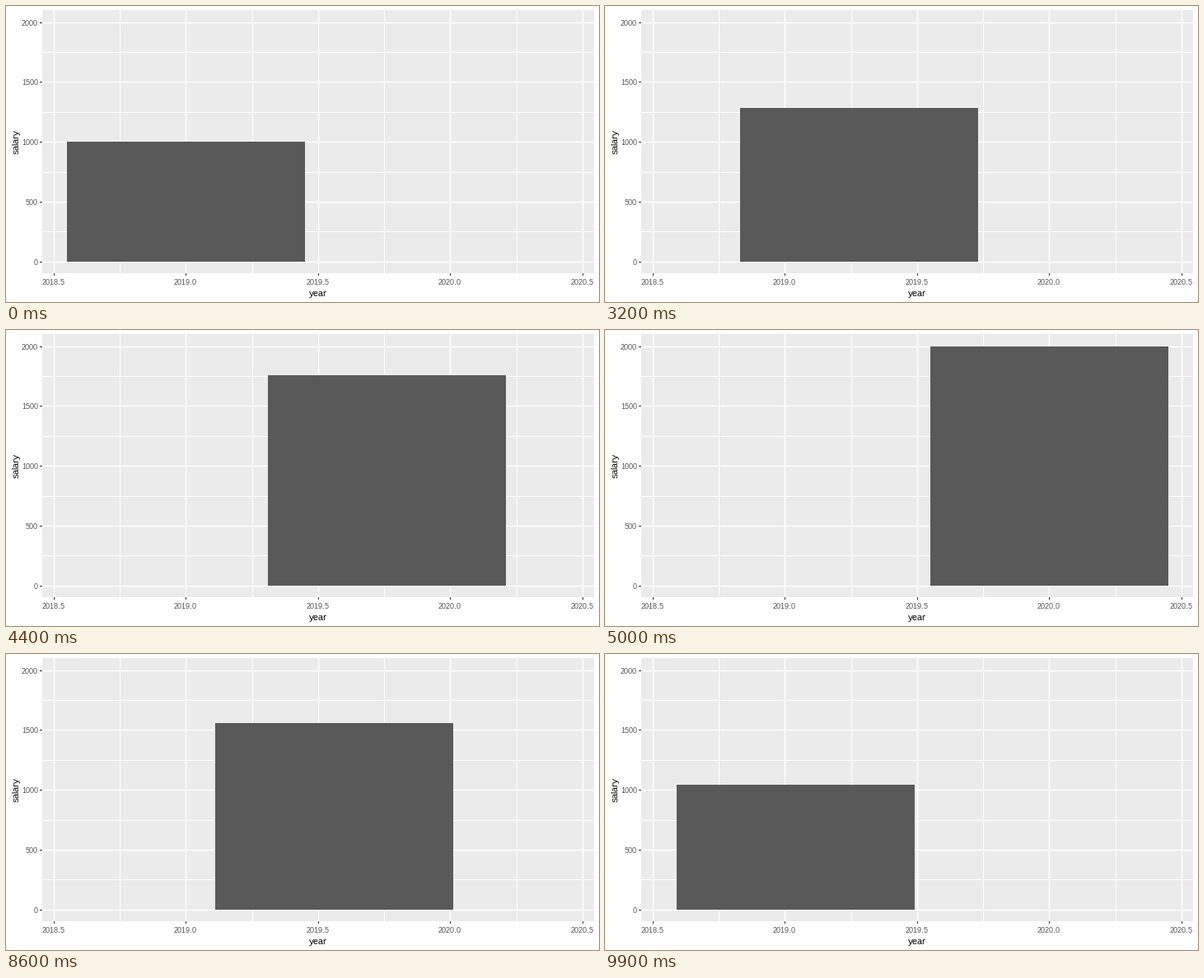
A matplotlib script that plays this animation: 720 by 360 pixels, repeating every 10 s.

```python
import math

import matplotlib.pyplot as plt
import numpy as np
from matplotlib.animation import FuncAnimation
from matplotlib.patches import Rectangle

W, H, DPI = 720, 360, 72
FRAMES, INTERVAL = 100, 100
PANEL = (44, 5, 714, 325)  # left, top, right, bottom in pixels
BAR_WIDTH = 0.9

plt.rcParams.update({
    "font.family": "Liberation Sans",
    "text.hinting": "native",
    "text.hinting_factor": 1,
    "toolbar": "None",
})


def snap(v):
    return math.floor(v + 0.5)


def px(year):
    return 74.1 + (year - 2018.55) * 320.84


def py(salary):
    return 310.65 - salary * 0.1455


fig = plt.figure(figsize=(W / DPI, H / DPI), dpi=DPI, facecolor="white")
ax = fig.add_axes([0, 0, 1, 1])
ax.set_xlim(0, W)
ax.set_ylim(H, 0)
ax.axis("off")


def box(x0, y0, x1, y1, color, z, smooth=False):
    patch = Rectangle((x0, y0), x1 - x0, y1 - y0, facecolor=color, linewidth=0,
                      zorder=z, antialiased=smooth, snap=False)
    return ax.add_patch(patch)


def label(x, y, text, size, color, **kw):
    ax.text(x, y, text, fontsize=size, color=color, zorder=5, **kw)


def grid_x(year, width):
    c = snap(px(year)) + 0.5
    box(c - width / 2, top, c + width / 2, bottom, "white", 2, True)


def grid_y(salary, width):
    c = snap(py(salary)) + 0.5
    box(left, c - width / 2, right, c + width / 2, "white", 2, True)


left, top, right, bottom = PANEL
box(left, top, right, bottom, "#EBEBEB", 1)

for year in np.arange(2018.75, 2020.5, 0.5):
    grid_x(year, 1)
for salary in range(250, 2000, 500):
    grid_y(salary, 1)

for year in np.arange(2018.5, 2020.6, 0.5):
    grid_x(year, 1.42)
    x = snap(px(year))
    box(x, bottom, x + 1, bottom + 3, "#333333", 4)
    label(x, 339, f"{year:.1f}", 9, "#4D4D4D", ha="center", va="baseline")

for salary in range(0, 2001, 500):
    grid_y(salary, 1.42)
    y = snap(py(salary))
    box(left - 3, y, left, y + 1, "#333333", 4)
    label(39, y + 4, str(salary), 9, "#4D4D4D", ha="right", va="baseline")

label(379, 353, "year", 11, "black", ha="center", va="baseline")
label(17.5, 165.5, "salary", 11, "black", ha="right", va="center", rotation=90)

bar = box(0, 0, 1, 1, "#595959", 3)


def update(frame):
    t = np.interp(frame, [0, 25, 50, 75, 100], [0, 0, 1, 1, 0])
    year, salary = 2019 + t, 1000 + 1000 * t
    x0 = snap(px(year - BAR_WIDTH / 2))
    x1 = snap(px(year + BAR_WIDTH / 2))
    y0, y1 = snap(py(salary)), snap(py(0))
    bar.set_bounds(x0, y0, x1 - x0, y1 - y0)
    return (bar,)


anim = FuncAnimation(fig, update, frames=FRAMES, interval=INTERVAL,
                     repeat=True, repeat_delay=0, blit=False)
plt.show()
```
